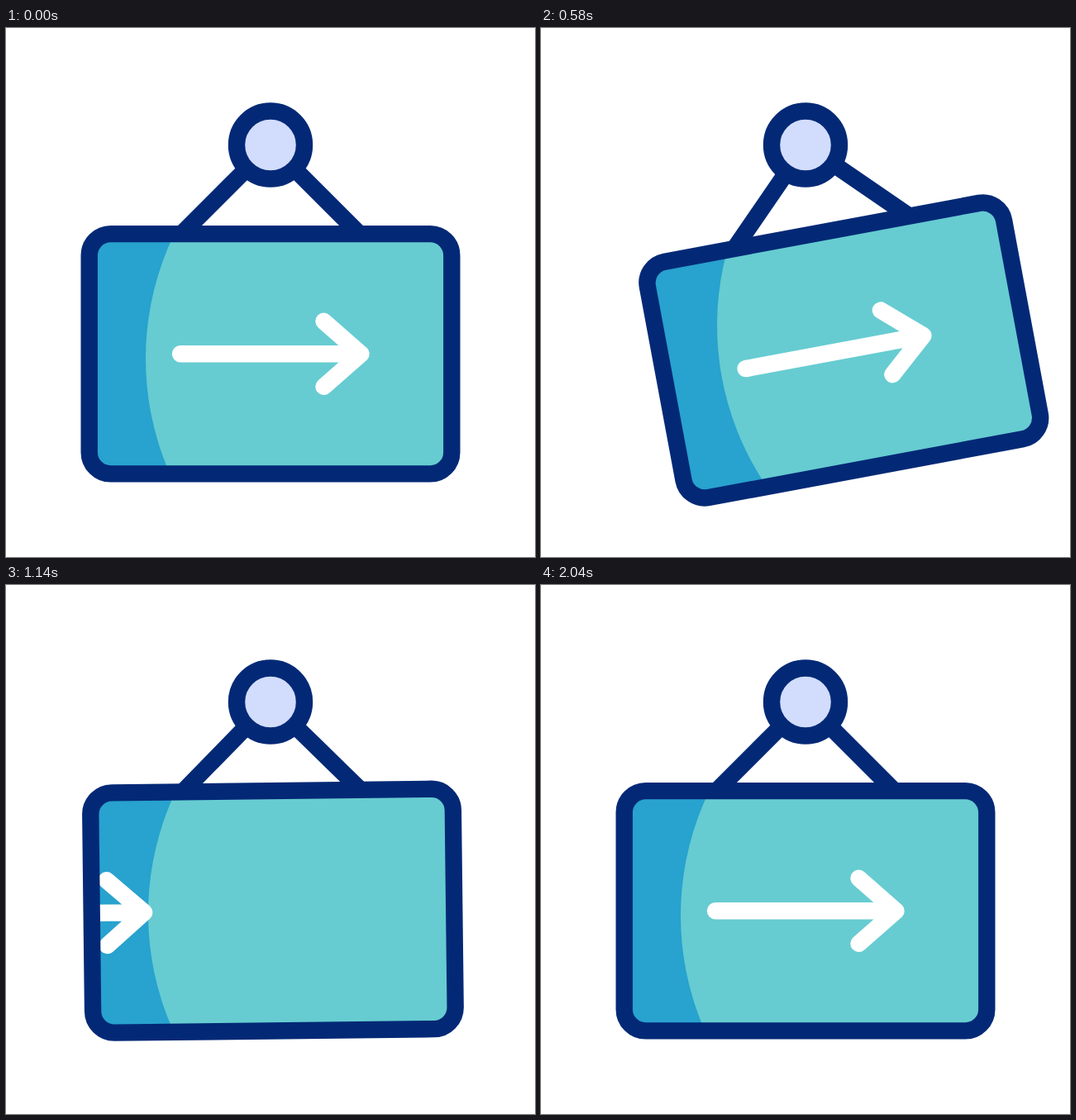
Animation of 640x640 px, one loop 3.02 s. Source, as an HTML page:

```html
<!DOCTYPE html>
<html>
<head>
<meta charset="utf-8">
<style>
html, body { margin: 0; width: 100%; height: 100%; overflow: hidden; background: #fff; }
svg { display: block; width: 100vw; height: 100vh; }
.line { fill: none; stroke: #032976; stroke-width: 20.4; stroke-linecap: round; stroke-linejoin: round; }
#arrow { stroke: #fff; }
</style>
</head>
<body>
<svg viewBox="0 0 640 640">
  <clipPath id="board"><rect x="100.7" y="249.1" width="438.6" height="290.3" rx="26"/></clipPath>
  <g id="sign">
    <path class="line" d="M212.5 249 320 141.5 427.5 249"/>
    <g clip-path="url(#board)">
      <rect x="100" y="249" width="440" height="291" fill="#28a2ce"/>
      <circle cx="515" cy="400" r="346" fill="#66ccd1"/>
      <path id="arrow" class="line" d="M211 394.3H429.5M384.5 354.8 429.5 394.3 384.5 433.8"/>
    </g>
    <rect class="line" x="100.7" y="249.1" width="438.6" height="290.3" rx="26"/>
  </g>
  <circle class="line" cx="320" cy="141.5" r="41" style="fill:#d2dcfd"/>
</svg>
<script>
const LOOP = 3020;
const WRAP = 960; // the arrow is out of sight here and re-enters from the left

// Keys are [ms, value]
const swing = [[0, 0], [375, 14.05], [540, 12.2], [580, 10.6], [890, -8.1], [1080, -3.4],
  [1140, 0.63], [1310, 6], [1460, 3.97], [1620, 1], [1810, -2.5], [2040, 0]];
const leave = [[0, 0], [390, -36.5], [580, -12], [880, 300], [WRAP, 360]];
const enter = [[WRAP, -360], [1140, -266], [1480, 33.5], [2040, 0]];

const slope = (a, b) => (b[1] - a[1]) / (b[0] - a[0]);

// Flat at turning points and ends, harmonic mean of the slopes elsewhere
function tangent(keys, i) {
  if (i === 0 || i === keys.length - 1) return 0;
  const a = slope(keys[i - 1], keys[i]), b = slope(keys[i], keys[i + 1]);
  return a * b > 0 ? 2 * a * b / (a + b) : 0;
}

function sample(keys, t) {
  const last = keys[keys.length - 1];
  if (t >= last[0]) return last[1];
  const i = keys.findIndex(k => k[0] > t) - 1;
  const [t0, v0] = keys[i], [t1, v1] = keys[i + 1];
  const d = t1 - t0, p = (t - t0) / d, q = 1 - p;
  return v0 * q * q * (1 + 2 * p) + v1 * p * p * (3 - 2 * p)
    + d * p * q * (tangent(keys, i) * q - tangent(keys, i + 1) * p);
}

const sign = document.getElementById('sign');
const arrow = document.getElementById('arrow');
const start = performance.now();

function draw() {
  const t = (performance.now() - start) % LOOP;
  sign.setAttribute('transform', `rotate(${-sample(swing, t)} 320 141.5)`);
  arrow.setAttribute('transform', `translate(${sample(t < WRAP ? leave : enter, t)})`);
  requestAnimationFrame(draw);
}
draw();
</script>
</body>
</html>
```
